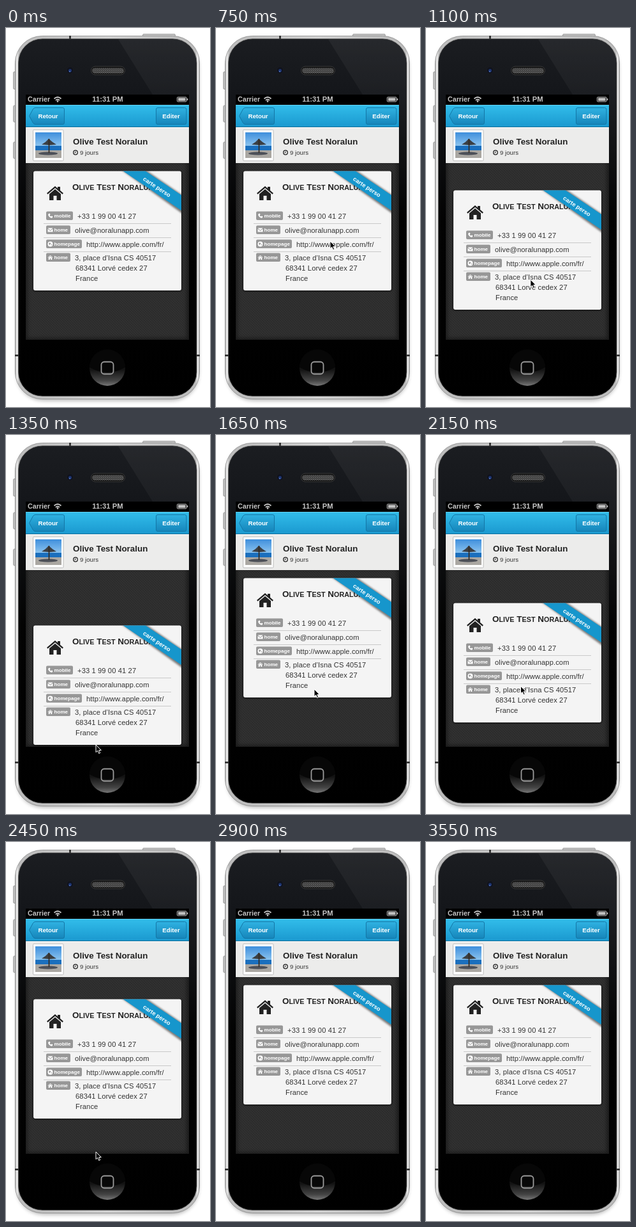
Animation, 320 px wide and 592 px high, one loop 3600 ms. Source, as an HTML page:

```html
<!DOCTYPE html>
<html lang="fr">
<head>
<meta charset="utf-8">
<title>Fiche contact</title>
<style>
html, body { margin: 0; width: 100%; height: 100%; overflow: hidden; background: #fff; }
svg { display: block; width: 320px; height: 592px; font-family: "Liberation Sans", Arial, sans-serif; }
.b { font-weight: bold; }
.row { font-size: 11.2px; letter-spacing: .1px; fill: #333; }
.tag { font-size: 8.1px; font-weight: bold; fill: #fff; }
.nav { font-size: 9.7px; font-weight: bold; fill: #fff; text-anchor: middle; }
</style>
</head>
<body>
<svg viewBox="0 0 320 592">
<defs>
  <linearGradient id="chrome" x2="1" y2="0">
    <stop offset="0" stop-color="#999"/><stop offset=".008" stop-color="#f6f6f6"/>
    <stop offset=".02" stop-color="#bbb"/><stop offset=".5" stop-color="#d4d4d4"/>
    <stop offset=".98" stop-color="#bbb"/><stop offset=".992" stop-color="#f4f4f4"/>
    <stop offset="1" stop-color="#999"/>
  </linearGradient>
  <linearGradient id="glass" x2="0" y2="1">
    <stop offset="0" stop-color="#1b1d21"/><stop offset=".16" stop-color="#14161a"/>
    <stop offset=".5" stop-color="#030303"/><stop offset="1" stop-color="#000"/>
  </linearGradient>
  <linearGradient id="gloss" x2="0" y2="1">
    <stop offset="0" stop-color="#fff" stop-opacity=".05"/><stop offset="1" stop-color="#fff" stop-opacity="0"/>
  </linearGradient>
  <linearGradient id="bar" x2="0" y2="1">
    <stop offset="0" stop-color="#32bdea"/><stop offset="1" stop-color="#1a98cf"/>
  </linearGradient>
  <linearGradient id="btn" x2="0" y2="1">
    <stop offset="0" stop-color="#2fb2e2"/><stop offset="1" stop-color="#1686bb"/>
  </linearGradient>
  <linearGradient id="home" x2="0" y2="1">
    <stop offset="0" stop-color="#050505"/><stop offset=".55" stop-color="#131313"/>
    <stop offset=".85" stop-color="#444"/><stop offset="1" stop-color="#777"/>
  </linearGradient>
  <linearGradient id="sky" x2="0" y2="1">
    <stop offset="0" stop-color="#3f8fdc"/><stop offset="1" stop-color="#8fc6f0"/>
  </linearGradient>
  <pattern id="weave" width="4" height="4" patternUnits="userSpaceOnUse">
    <rect width="4" height="4" fill="#2f2f2f"/>
    <path d="M0 0L2 2M2 4L4 2" stroke="#282828"/><path d="M0 2L2 4M2 0L4 2" stroke="#353535" stroke-width=".7"/>
  </pattern>
  <pattern id="mesh" width="3" height="3" patternUnits="userSpaceOnUse">
    <rect width="3" height="3" fill="#2c2c2c"/><path d="M0 0L3 3M3 0L0 3" stroke="#777" stroke-width=".7"/>
  </pattern>
  <clipPath id="view"><rect x="31" y="211" width="256" height="276"/></clipPath>
  <clipPath id="cardBox"><rect x="43" y="223.500" width="232" height="186.500" rx="3"/></clipPath>
  <filter id="soft" x="-20%" y="-20%" width="140%" height="140%"><feGaussianBlur stdDeviation="3"/></filter>
  <filter id="blur" x="-20%" y="-20%" width="140%" height="140%"><feGaussianBlur stdDeviation="1.800"/></filter>
  <path id="house" d="M0 12L13 1L17 4.400V2H21V7.800L26 12L24.500 13.700L13 4L1.500 13.700ZM4 13.300L13 5.800L22 13.300V23H15.500V16H10.500V23H4Z"/>
</defs>

<!-- Phone body -->
<rect x="17" y="18" width="285" height="564" rx="42" opacity=".3" filter="url(#soft)"/>
<g fill="#c4c4c4" stroke="#888" stroke-width=".7">
  <rect x="214.500" y="9.500" width="51" height="5" rx="1.500"/>
  <rect x="11.500" y="68.500" width="5" height="27" rx="1.500"/>
  <rect x="11.500" y="121" width="5" height="26" rx="2"/>
  <rect x="11.500" y="178" width="5" height="26" rx="2"/>
</g>
<rect x="14.500" y="12.500" width="289" height="567" rx="42" fill="url(#chrome)" stroke="#888" stroke-width=".8"/>
<path d="M14 511.500H20M298 511.500H304M100.500 12V17" stroke="#222" stroke-width="2.500"/>
<rect x="19.500" y="17" width="279.500" height="558" rx="37.500" fill="url(#glass)" stroke="#444" stroke-width=".8"/>
<path d="M176 17.500H261.500Q298.500 17.500 298.500 54.500V300L287 270V104H230Z" fill="url(#gloss)"/>
<circle cx="100.500" cy="66" r="5.500" fill="#10131d" stroke="#1d1d20"/>
<circle cx="100.500" cy="66.500" r="2.500" fill="#1d3472"/><circle cx="100" cy="68" r="1" fill="#57b"/>
<rect x="133.500" y="60" width="53" height="13" rx="6.500" fill="#111" stroke="#3b3b3b"/>
<rect x="135" y="62.500" width="50" height="8.500" rx="4.200" fill="url(#mesh)"/>
<circle cx="159" cy="531" r="28" fill="url(#home)"/>
<path d="M131 530Q159 546 187 530A28 28 0 0 0 131 530Z" fill="#070707"/>
<rect x="149.500" y="521.500" width="19" height="19" rx="4.500" fill="none" stroke="#9b9b9b" stroke-width="1.800"/>

<!-- Screen -->
<rect x="31" y="104" width="256" height="383"/>
<g clip-path="url(#view)">
  <rect x="31" y="211" width="256" height="276" fill="url(#weave)"/>
  <rect x="30" y="205" width="257" height="283" fill="none" stroke="#000" stroke-width="5" opacity=".6" filter="url(#soft)"/>
  <g id="card">
    <rect x="42.500" y="224" width="233" height="187" rx="3" opacity=".7" filter="url(#blur)"/>
    <rect x="43" y="223.500" width="232" height="186.500" rx="3" fill="#f4f4f4"/>
    <use href="#house" x="64" y="246" fill="#222"/>
    <text class="b" x="104" y="253" fill="#222" font-size="13.500">O<tspan font-size="10.800">LIVE</tspan> T<tspan font-size="10.800">EST</tspan> N<tspan font-size="10.800">ORALUN</tspan></text>
    <g id="rows"></g>
    <g class="row">
      <text x="109" y="379">68341 Lorvé cedex 27</text>
      <text x="109" y="395">France</text>
    </g>
    <g clip-path="url(#cardBox)">
      <path d="M180 221H218L278 262V291Z" opacity=".5" filter="url(#blur)"/>
      <path d="M180 221H215L278 263V287Z" fill="#1696cc"/>
      <text class="b" font-size="9.200" fill="#fff" text-anchor="middle" transform="translate(235 251) rotate(33.500)">carte perso</text>
    </g>
  </g>
</g>

<!-- Status bar -->
<g class="b" fill="#c4c4c4">
  <text x="34" y="115" font-size="10.700">Carrier</text>
  <text x="159.500" y="115" font-size="11.300" text-anchor="middle">11:31 PM</text>
</g>
<g fill="none" stroke="#c4c4c4" stroke-width="1.700">
  <path d="M75.500 110.500Q81 105.500 86.500 110.500M77.800 113Q81 110 84.200 113"/>
  <circle cx="81" cy="114.500" r=".6"/>
  <rect x="268.500" y="108" width="14.500" height="7" rx="1" stroke-width="1"/>
  <path d="M270 111.500H281.500" stroke-width="4.500"/><path d="M284.500 110V113" stroke-width="1.500"/>
</g>

<!-- Navigation bar -->
<rect x="31" y="120" width="256" height="35" fill="url(#bar)"/>
<path d="M31 120.500H287" stroke="#62d2f3"/><path d="M31 154.500H287" stroke="#126d98"/>
<g fill="url(#btn)" stroke="#1476a6">
  <path d="M46 124.500H89Q91.500 124.500 91.500 127V148Q91.500 150.500 89 150.500H46Q44 150.500 42.500 148.500L36.500 137.500L42.500 126.500Q44 124.500 46 124.500Z"/>
  <rect x="235.500" y="124.500" width="47.500" height="26" rx="2.500"/>
</g>
<text class="nav" x="66" y="141">Retour</text>
<text class="nav" x="259" y="141">Editer</text>

<!-- Profile header -->
<rect x="31" y="155" width="256" height="56" fill="#ececeb"/>
<path d="M31 155.500H287" stroke="#fff"/>
<rect x="42.500" y="159" width="47.500" height="48.500" rx="1.500" fill="#fff" stroke="#bcbcbc"/>
<g transform="translate(46 163)">
  <rect width="41" height="22" fill="url(#sky)"/>
  <rect y="21" width="41" height="8" fill="#1b6fbd"/>
  <rect y="28" width="41" height="12" fill="#aaa7a2"/>
  <ellipse cx="20" cy="33" rx="15" ry="2.500" fill="#4d5058"/>
  <path d="M10 19Q17 15 21 10Q26 15 33 19L22 20Z" fill="#3b3f44"/>
  <path d="M21.500 10V32" stroke="#33291f" stroke-width="1.600"/>
</g>
<text class="b" x="105" y="182" font-size="13.400" fill="#222">Olive Test Noralun</text>
<circle cx="109" cy="194.500" r="3.300" fill="none" stroke="#222" stroke-width="1.300"/>
<path d="M109 192.500V195H107.500" fill="none" stroke="#222" stroke-width=".9"/>
<text x="116" y="198" font-size="9.700" fill="#333">9 jours</text>

<path id="cursor" d="M0 0V11.500L2.700 9.100L4.700 13.500L6.700 12.600L4.800 8.400H8.300Z" stroke="#fff"/>
</svg>
<script>
const $ = id => document.getElementById(id);

// Contact rows: the tag fits its label, the value follows the tag
const icons = {
  phone: "M1 1L3 0L4 2L3 3Q3.500 4.500 5 5L6 4L8 5L7 7Q5 8 2.500 5.500T1 1Z",
  mail: "M0 1H8L4 4.500ZM0 2.300L4 5.500L8 2.300V7H0Z",
  globe: "M4 0A4 4 0 1 0 4 8A4 4 0 1 0 4 0ZM3 1.500L5 3L3 5.500L1.500 3.500ZM5.500 4.500H7L5.500 6.500Z",
  house: "M0 4L4 .5L8 4L7.500 4.600L4 1.500L.5 4.600ZM1.300 4.600L4 2.200L6.700 4.600V7.500H4.800V5.300H3.200V7.500H1.300Z"
};
const rows = [
  ["mobile", "phone", "+33 1 99 00 41 27"],
  ["home", "mail", "olive@noralunapp.com"],
  ["homepage", "globe", "http://www.apple.com/fr/"],
  ["home", "house", "3, place d’Isna CS 40517"]
];
rows.forEach(([label, icon, value], i) => {
  const row = document.createElementNS("http://www.w3.org/2000/svg", "g");
  row.setAttribute("transform", `translate(63 ${Math.round(298 + 21.8 * i)})`);
  row.innerHTML = `
    <rect y="-11.500" height="13.500" rx="2" fill="#979797"/>
    <path transform="translate(2.500 -8.500)" d="${icons[icon]}" fill="#fff" fill-rule="evenodd"/>
    <text class="tag" x="12.500" y="-2">${label}</text>
    <text class="row">${value}</text>
    ${i < rows.length - 1 ? '<path d="M-4 7.500H196" stroke="#c9c9c9"/>' : ""}`;
  $("rows").append(row);
  const width = Math.round(row.querySelector(".tag").getComputedTextLength() + 16);
  row.querySelector("rect").setAttribute("width", width);
  row.querySelector(".row").setAttribute("x", width + 7);
});

// Pointer path: time, x, y and how far the card is dragged
const LOOP = 3600, PULL = 75, HIDE = 2900;
const path = [
  [600, 320, 290, 0], [750, 179, 333, 0], [950, 179, 333, 0], [1300, 141, 484, PULL],
  [1400, 141, 484, PULL], [1650, 154, 397, 0], [1900, 165, 191, -40], [2300, 141, 484, PULL],
  [HIDE, 141, 484, PULL]
];
const ease = u => u * u * (3 - 2 * u);

function pose(t) {
  const i = path.findIndex(p => p[0] > t);
  if (i < 1) return [0, 0, 0];
  const a = path[i - 1], b = path[i];
  const u = ease((t - a[0]) / (b[0] - a[0]));
  return [1, 2, 3].map(k => a[k] + (b[k] - a[k]) * u);
}

// Once let go, the card springs back exponentially
const recoil = age => PULL * Math.exp(-age / 70);

function draw(now) {
  const t = now % LOOP;
  const [x, y, drag] = pose(t);
  const offset = t >= 2365 ? recoil(t - 2365) : t >= 1350 && t <= 1650 ? recoil(t - 1350) : drag;
  $("card").setAttribute("transform", `translate(0 ${Math.round(offset)})`);
  $("cursor").setAttribute("transform", `translate(${x} ${y})`);
  $("cursor").setAttribute("visibility", t >= 600 && t < HIDE ? "visible" : "hidden");
}

const start = performance.now();
function tick() {
  draw(performance.now() - start);
  requestAnimationFrame(tick);
}
tick();
</script>
</body>
</html>
```
